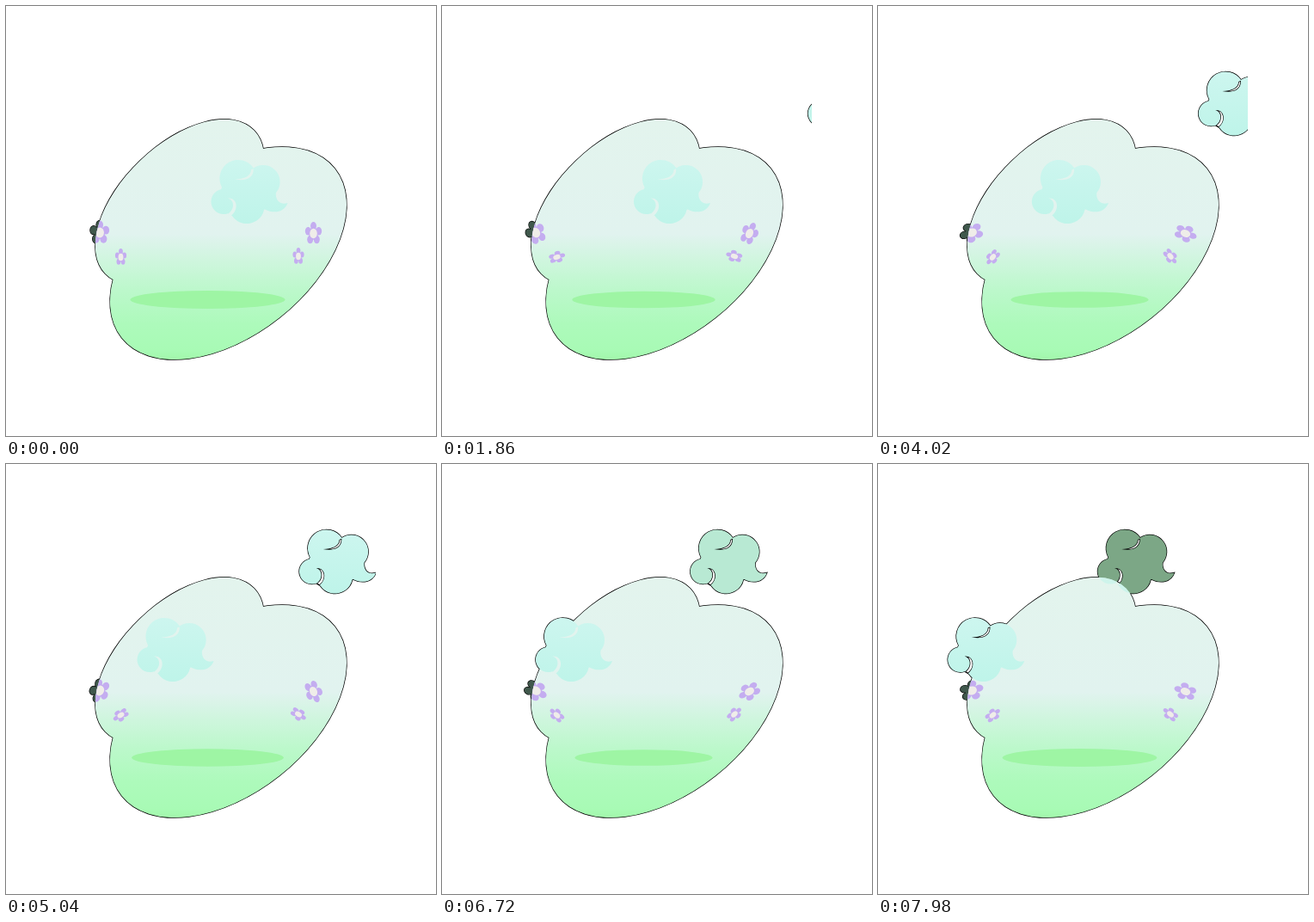
Write an HTML page with a canvas that moves like this. It is 500x500 px and loops after 8 s.

```html
<!DOCTYPE html>
<html lang="en">
<head>
<meta charset="utf-8">
<title>Meadow</title>
<style>
html, body { margin: 0; width: 100%; height: 100%; overflow: hidden; background: #fff; }
canvas { display: block; width: 100vmin; height: 100vmin; }
</style>
</head>
<body>
<canvas id="stage" width="500" height="500"></canvas>
<script>
const ctx = document.getElementById('stage').getContext('2d');
const LOOP = 8000, STEP = 60, TAU = Math.PI * 2;
const rad = deg => deg * Math.PI / 180;

// Meadow: the union of two tilted ellipses
const meadow = new Path2D();
meadow.ellipse(202, 228, 120.2, 66.7, rad(-43.9), 0, TAU);
meadow.closePath();
const lower = new Path2D();
lower.ellipse(258.5, 287.5, 158.2, 95.7, rad(-38.4), 0, TAU);
meadow.addPath(lower);

const cloud = makeCloud();
const ground = gradient(131, 412, [
  [0, '#e3f4ed'], [0.477, '#e1f3ef'], [0.6, '#cdf6dc'],
  [0.71, '#bcf8cb'], [0.85, '#adfabb'], [0.96, '#a8fab5'], [1, '#a1f7aa']
]);
const sky = gradient(0, 75, [[0, '#cdf6ef'], [1, '#bef4e9']]);

// Spin angles in degrees at key times
const KEYS = [0, 1860, 3060, 4020, 6060, 7260, 7980];
const BIG_SPIN = [0, 25, 80, 108, 205, 270, 288];
const SMALL_SPIN = [0, 72, 150, 220, 255, 360, 412];
const FADE_KEYS = [6400, 7260, 7980];
const FADE = [[200, 246, 236], [158, 210, 168], [124, 167, 134]];

function makeCloud() {
  const p = new Path2D();
  p.arc(32, 22, 21.6, rad(151), rad(326));
  p.arc(61, 26, 19.6, rad(236), rad(400));
  p.bezierCurveTo(75, 44, 78, 54, 89.5, 50.5);
  p.bezierCurveTo(86, 61, 74, 63.5, 63, 58);
  p.arc(42, 54, 20.6, rad(12), rad(146));
  p.arc(15, 49, 14.5, rad(70), rad(258));
  p.closePath();
  // Curl gaps
  p.moveTo(49.7, 10.8);
  p.bezierCurveTo(50.5, 22, 40, 25.5, 28, 23);
  p.bezierCurveTo(39, 23, 47, 19, 47, 12);
  p.closePath();
  p.moveTo(20, 45);
  p.bezierCurveTo(31, 44, 33, 58, 24, 65);
  p.lineTo(20.5, 63);
  p.bezierCurveTo(28, 58, 28, 47, 20, 45);
  p.closePath();
  return p;
}

function gradient(y0, y1, stops) {
  const g = ctx.createLinearGradient(0, y0, 0, y1);
  stops.forEach(([at, color]) => g.addColorStop(at, color));
  return g;
}

function sample(keys, values, t) {
  if (t <= keys[0]) return values[0];
  for (let i = 1; i < keys.length; i++) {
    if (t <= keys[i]) {
      const k = (t - keys[i - 1]) / (keys[i] - keys[i - 1]);
      return values[i - 1] + (values[i] - values[i - 1]) * k;
    }
  }
  return values[values.length - 1];
}

function at(x, y, draw) {
  ctx.save();
  ctx.translate(x, y);
  draw();
  ctx.restore();
}

function outline(path) {
  ctx.strokeStyle = '#000';
  ctx.lineWidth = 1.4;
  ctx.stroke(path);
}

function disc(x, y, r, color) {
  ctx.fillStyle = color;
  ctx.beginPath();
  ctx.arc(x, y, r, 0, TAU);
  ctx.fill();
}

function flower(x, y, w, h, angle, color, core, grow = 0) {
  at(x, y, () => {
    ctx.rotate(rad(angle));
    ctx.scale(w, h);
    for (let i = 0; i < 5; i++) {
      const a = rad(i * 72 - 90);
      disc(0.65 * Math.cos(a), 0.65 * Math.sin(a), 0.35 + grow, color);
    }
    disc(0, 0, 0.54, color);
    if (core) disc(0, 0, 0.43, core);
  });
}

function draw(t) {
  ctx.clearRect(0, 0, 500, 500);
  ctx.save();
  ctx.beginPath();
  ctx.rect(70, 70, 360, 360);
  ctx.clip();

  const ease = ms => 93 * (1 - Math.cos(Math.PI * ms / 11000));
  const drift = ease(t + 200) - ease(200);
  const near = [238 - drift, 178.5];
  const far = [443.7 - 1.2 * drift, 76];
  const big = sample(KEYS, BIG_SPIN, t);
  const small = sample(KEYS, SMALL_SPIN, t);
  const leftFlower = [109, 263.5, 11.5, 14, -big];

  at(...far, () => outline(cloud));
  at(...near, () => outline(cloud));
  outline(meadow);
  flower(...leftFlower, '#000', null, 0.05);
  flower(...leftFlower, '#40584c');

  at(...far, () => {
    const rgb = [0, 1, 2].map(i => sample(FADE_KEYS, FADE.map(c => c[i]), t));
    ctx.fillStyle = t < FADE_KEYS[0] ? sky : `rgb(${rgb.map(Math.round)})`;
    ctx.fill(cloud, 'evenodd');
  });

  ctx.fillStyle = ground;
  ctx.fill(meadow);

  ctx.save();
  ctx.clip(meadow);
  at(...far, () => {
    ctx.globalAlpha = sample([6400, 7980], [1, 0.6], t);
    ctx.fillStyle = sky;
    ctx.fill(cloud, 'evenodd');
  });
  const rx = 85 + 5 * Math.cos(TAU * t / 2700);
  ctx.fillStyle = '#9ef5a4';
  ctx.beginPath();
  ctx.ellipse(234.5, 341.5, rx, rx * 0.117, 0, 0, TAU);
  ctx.fill();
  ctx.restore();

  at(...near, () => {
    ctx.fillStyle = sky;
    ctx.fill(cloud, 'evenodd');
  });

  ctx.save();
  ctx.clip(meadow);
  const petal = '#c4adf0', core = '#efede9';
  flower(...leftFlower, petal, core);
  flower(357.5, 264.5, 10, 13.5, big, petal, core);
  flower(133.5, 292, 6.8, 10, small, petal, core);
  flower(340, 291, 6.8, 10, -small, petal, core);
  ctx.restore();

  ctx.restore();
}

const start = performance.now();
function tick() {
  const t = (performance.now() - start) % LOOP;
  draw(Math.floor(t / STEP) * STEP);
  requestAnimationFrame(tick);
}
tick();
</script>
</body>
</html>
```
